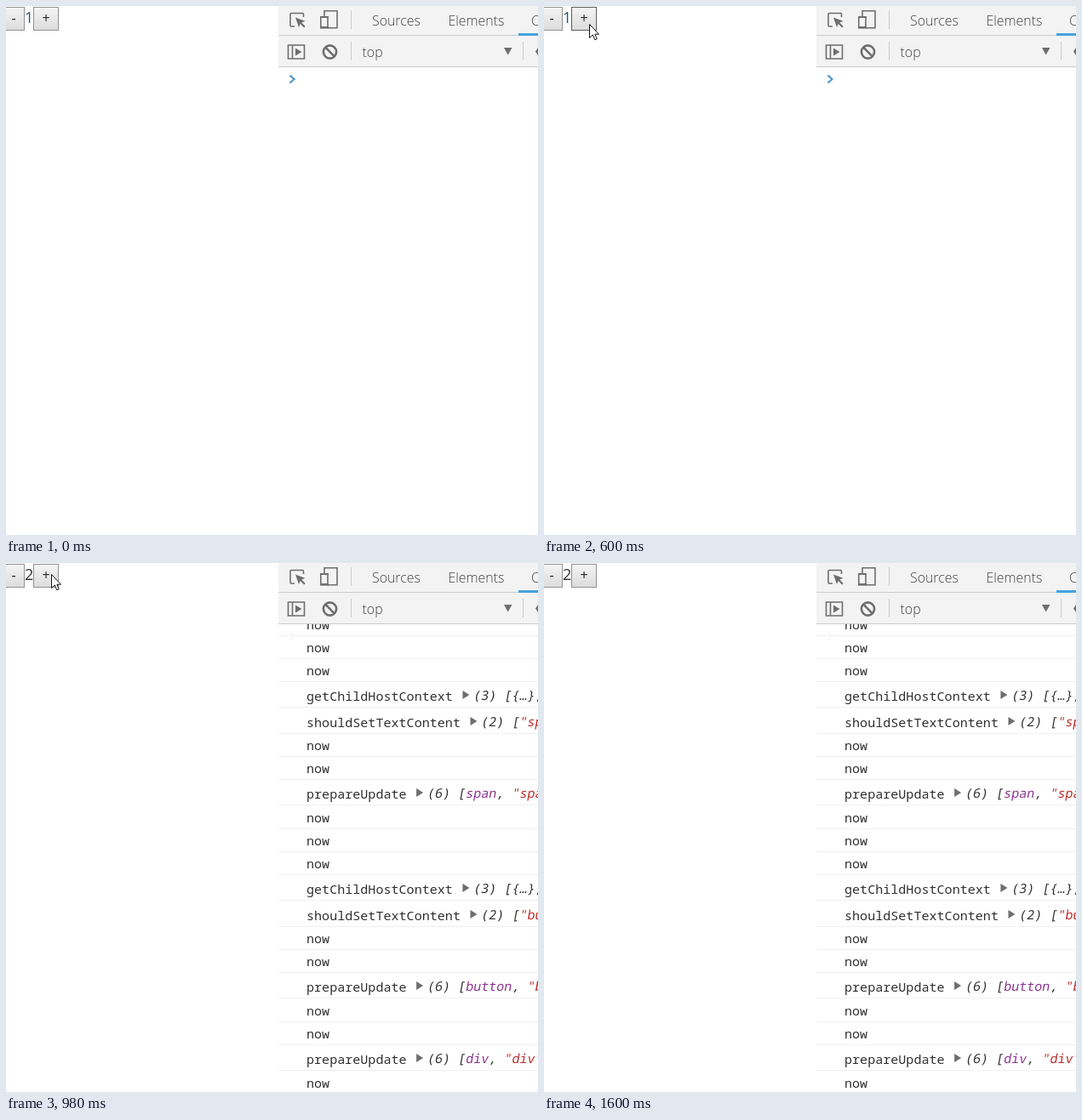
Animation of 625x622 px, one loop 2.07 s. Source, as an HTML page:

```html
<!DOCTYPE html>
<html lang="en">
<head>
<meta charset="utf-8">
<title>Counter and console</title>
<style>
  html, body { margin: 0; width: 100%; height: 100%; overflow: hidden; background: #fff; }
  svg { display: block; width: 625px; height: 622px; }
  text { white-space: pre; }
  .ui { font: 300 15.9px "Open Sans", "Noto Sans", sans-serif; fill: #444; }
  .num { font: 18px "Open Sans", "Noto Sans", sans-serif; }
  .btn { font: 16px "Open Sans", "Noto Sans", sans-serif; fill: #222; text-anchor: middle; }
  .log { font: 15.08px "Noto Sans Mono", "DejaVu Sans Mono", monospace; fill: #303030; }
  .str { fill: #be2f2a; }
  .node { fill: #8d3590; }
  .tag { fill: #8e8a8e; }
  .attr { fill: #994500; }
  .line { stroke: #f0f0f0; }
  .icon { fill: none; stroke: #6e6e6e; stroke-width: 1.6; }
  .solid { fill: #6e6e6e; }
  .chevron { fill: none; stroke-width: 2.1; }

  #pointer, #plus, .before, .first, .after, .full { animation: 2070ms step-end infinite; }
  #pointer { animation-name: move; }
  #plus { animation-name: hover; }
  .before { animation-name: before; }
  .first { animation-name: first; }
  .after { animation-name: after; }
  .full { animation-name: full; }

  @keyframes before { 0% { opacity: 1 } 40.09%, 100% { opacity: 0 } }
  @keyframes after { 0% { opacity: 0 } 40.09%, 100% { opacity: 1 } }
  @keyframes first { 0% { opacity: 0 } 40.09% { opacity: 1 } 47.34%, 100% { opacity: 0 } }
  @keyframes full { 0% { opacity: 0 } 47.34%, 100% { opacity: 1 } }
  @keyframes hover { 0% { stroke: #929292 } 25.12% { stroke: #5c5c5c } 40.09%, 100% { stroke: #929292 } }
  @keyframes move {
    0% { transform: translate(-40px, -40px) }
    3.38% { transform: translate(430px, 493px) }
    7.24% { transform: translate(303px, 312px) }
    10.62% { transform: translate(174px, 148px) }
    14.49% { transform: translate(92px, 55px) }
    17.87% { transform: translate(70px, 36px) }
    21.73% { transform: translate(59px, 27px) }
    25.12% { transform: translate(55px, 23px) }
    28.98% { transform: translate(53px, 21px) }
    32.36% { transform: translate(53px, 15px) }
    36.23% { transform: translate(53px, 13px) }
    51.2% { transform: translate(75px, 55px) }
    55.07% { transform: translate(149px, 190px) }
    58.45% { transform: translate(241px, 346px) }
    62.31% { transform: translate(320px, 472px) }
    66.18% { transform: translate(370px, 550px) }
    69.56% { transform: translate(400px, 592px) }
    73.42% { transform: translate(412px, 598px) }
    77.29%, 100% { transform: translate(-40px, -40px) }
  }
</style>
</head>
<body>
<svg viewBox="0 0 625 622">
  <defs>
    <linearGradient id="face" x2="0" y2="1">
      <stop offset="0" stop-color="#f4f4f4"/>
      <stop offset="1" stop-color="#dcdcdc"/>
    </linearGradient>
  </defs>

  <g fill="url(#face)" stroke="#929292">
    <rect x="-8.5" y="1.5" width="30" height="27"/>
    <rect id="plus" x="32.5" y="1.5" width="29" height="27"/>
  </g>
  <text class="btn" x="9" y="20">-</text>
  <text class="btn" x="47" y="20">+</text>
  <text class="num before" x="22" y="20" fill="#2f5568">1</text>
  <text class="num after" x="22" y="20" fill="#333">2</text>

  <g id="first" class="first"></g>
  <g id="full" class="full"></g>
  <path class="chevron before" stroke="#4a94cc" d="M333.5 81.5l5 4.5-5 4.5"/>
  <path class="chevron after" stroke="#f5f6f8" d="M333.5 81.5l5 4.5-5 4.5"/>
  <path class="chevron first" stroke="#777" d="M333.5 275.5l5 4.5-5 4.5"/>

  <rect x="320" width="305" height="72" fill="#f3f3f3"/>
  <path stroke="#ccc" d="M320 34.5H625M320 71.5H625M405.5 5V27M405.5 42V64M607.5 42V64"/>
  <rect x="602" y="32" width="23" height="3" fill="#45a1de"/>
  <g class="icon">
    <path d="M339 24H335Q334 24 334 23V9.500Q334 8.500 335 8.500H348.500Q349.500 8.500 349.500 9.500V13"/>
    <path d="M374 12V5.800H389V25.700H378"/>
    <path d="M369.800 12.700H378V25.500H369.800Z"/>
    <path d="M331.500 46H350.500V62H331.500ZM336.500 46V62"/>
    <path stroke-width="2.6" d="M375.300 48.700L385.800 59.300"/>
    <circle cx="380.500" cy="54" r="7.600" stroke-width="2.600"/>
  </g>
  <g class="solid">
    <path d="M340 13.500L351.500 17.700 347.300 19.500 351.700 24 350.200 25.500 345.700 21 344 25Z"/>
    <path d="M369 12H379V14H369ZM369 24H379V26.500H369Z"/>
    <path d="M340 49.500L347.500 54 340 58.500Z"/>
    <path d="M585 49H594.500L589.700 57.500Z"/>
    <path d="M622 53.500L625 49V58Z"/>
  </g>
  <g class="ui">
    <text x="430" y="23">Sources</text>
    <text x="519.500" y="23">Elements</text>
    <text x="617" y="23">Console</text>
    <text x="418.500" y="60">top</text>
  </g>

  <path id="pointer" fill="#fff" stroke="#111" d="M.5 .5V16.500L4.300 13 6.800 18.800 9.200 17.700 6.800 12.200H11.500Z"/>
</svg>
<script>
  const LEFT = 353, PITCH = 9.05;
  const span = (cls, s) => `<tspan class="${cls}">${s}</tspan>`;
  const now = ["now"];
  const child = ["getChildHostContext", "(3) [{…}, {…}]"];
  const setText = s => ["shouldSetTextContent", "(2) [" + span("str", `"${s}"`)];
  const update = s => ["prepareUpdate", "(6) [" + span("node", s) + ", " + span("str", `"${s}"`)];
  const root = ["getRootHostContext",
    span("tag", "&lt;div ") + span("attr", "id") + span("tag", '="'), true];

  // Each row hangs on the rule below it; arguments sit a pixel above the name.
  function row([name, args, upright], rule) {
    const y = rule - 7;
    let out = `<path class="line" d="M320 ${rule + .5}H625"/>
      <text class="log" x="${LEFT}" y="${y}">${name}</text>`;
    if (args) {
      const end = LEFT + name.length * PITCH, gap = upright ? 16 : 11.5;
      const x = end + gap + (upright ? 11.5 : 12);
      const slant = upright ? "" : " skewX(-10)";
      out += `<path class="solid" d="M${end + gap} ${y - 12}l8 5-8 5z"/>
        <text class="log" transform="translate(${x} ${y - 1})${slant}">${args}</text>`;
    }
    return out;
  }

  function fill(id, rows, rules) {
    document.getElementById(id).innerHTML = rows.map((r, i) => row(r, rules[i])).join("");
  }

  fill("first", [now, now, now, root, now, now, now],
    [100, 127, 154, 184, 212, 239, 265]);
  fill("full", [
    now, now, now, child, setText("span"), now, now, update("span"),
    now, now, now, child, setText("button"), now, now, update("button"),
    now, now, update("div"), now
  ], [85, 112, 139, 169, 200, 227, 254, 284, 312, 339, 366, 396, 427, 454, 481, 511, 539, 566, 596, 624]);
</script>
</body>
</html>
```
